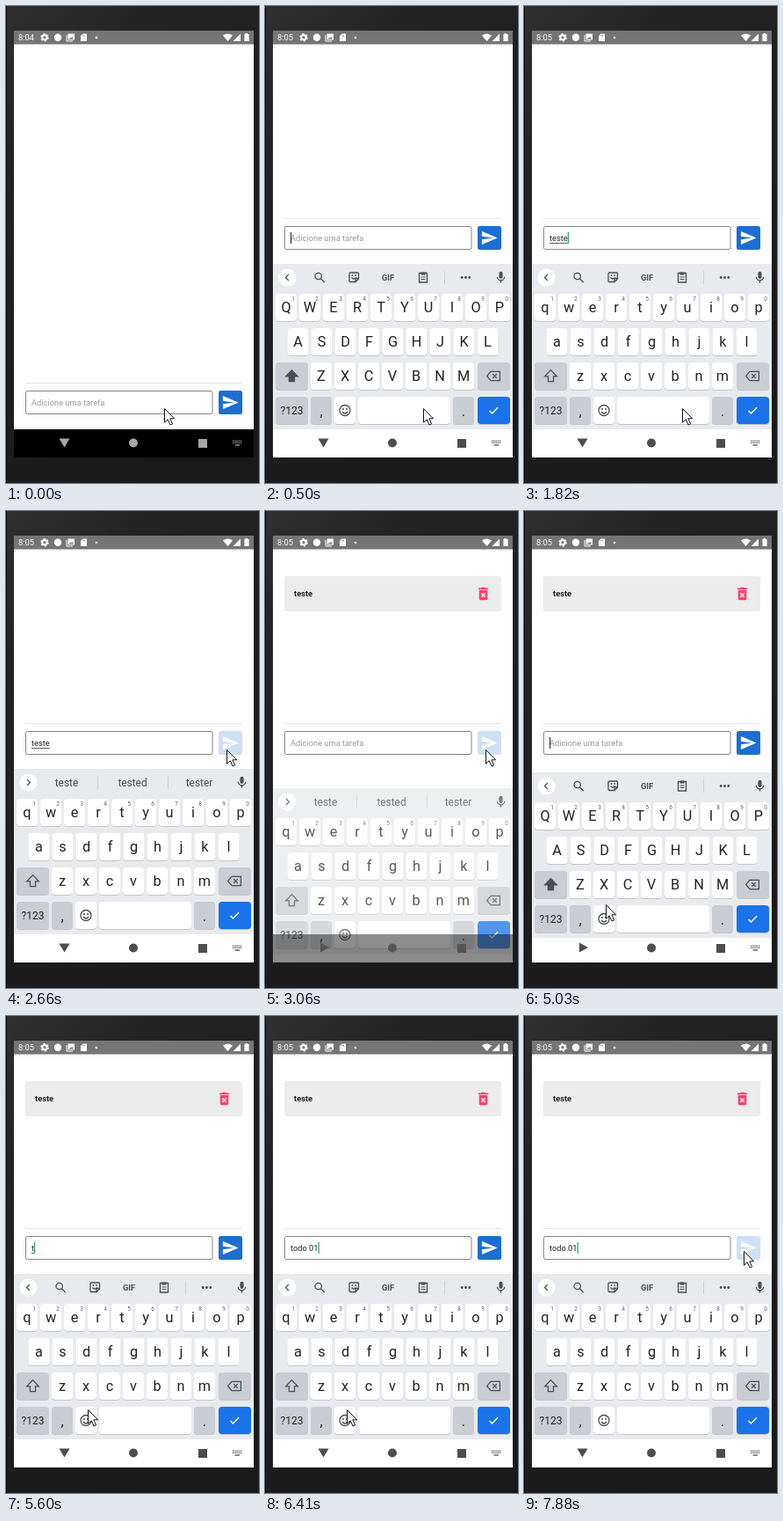
Recreate the animation shown at these times as an HTML page. Size 288 by 542 pixels, loop 8000 ms.

```html
<!DOCTYPE html>
<html lang="pt">
<head>
<meta charset="utf-8">
<title>Lista de tarefas</title>
<style>
html, body { margin: 0; width: 100%; height: 100%; overflow: hidden; background: #1c1c1c; }
svg { display: block; width: 288px; height: 542px; }
text { font: 9.3px Roboto, "Noto Sans", sans-serif; fill: #222; white-space: pre; }
.mid { text-anchor: middle; }
.key { font-size: 16.3px; text-anchor: middle; }
.hint { font-size: 6.5px; text-anchor: middle; fill: #5f6368; }
.word { font-size: 11.9px; text-anchor: middle; fill: #4a4d51; }
.line { fill: none; stroke: #4a4d51; stroke-width: 1.3; }
.dark { fill: #4a4d51; }
</style>
</head>
<body>
<svg viewBox="0 0 288 542">
  <defs>
    <linearGradient id="body" x1="0" y1="0" x2="0.5" y2="1">
      <stop offset="0" stop-color="#303030"/>
      <stop offset="0.25" stop-color="#232323"/>
      <stop offset="1" stop-color="#1a1a1a"/>
    </linearGradient>
    <clipPath id="screen"><rect x="9" y="28" width="273" height="485"/></clipPath>
  </defs>
  <rect width="288" height="542" fill="url(#body)"/>
  <rect width="1" height="542" fill="#0c0c0c"/>
  <g clip-path="url(#screen)">
    <rect x="9" y="28" width="273" height="485" fill="#fefefe"/>
    <g id="status"></g>
    <g id="item">
      <rect x="22" y="74" width="247" height="40" rx="3" fill="#ececec"/>
      <text x="33" y="97.3" font-weight="700" style="font-weight:700">teste</text>
    </g>
    <g id="form">
      <rect x="22" y="-9" width="247" height="1" fill="#e6e6e6"/>
      <rect x="22.5" y="0.5" width="212.5" height="26" rx="2" fill="#fff" stroke="#858585"/>
      <text id="hint" x="29" y="17.3" style="fill:#999">Adicione uma tarefa</text>
      <text id="typed" x="29" y="17.3"></text>
      <rect id="under" x="29" y="19" height="0.8" fill="#333"/>
      <rect id="caret" y="7" width="1.2" height="13"/>
      <g id="send"><rect x="242" width="27" height="27" rx="2.5" fill="#1c6fd0"/></g>
    </g>
    <g id="board"></g>
    <rect id="navBack" x="9" width="273"/>
    <g id="nav">
      <path id="back"/>
      <circle cx="145" cy="496.5" r="5"/>
      <rect x="219" y="492" width="10" height="10"/>
      <g id="navKeys"></g>
    </g>
  </g>
  <path id="mouse" d="M.5 .5V16.2L4.2 12.8 7 19 9.6 17.9 6.9 11.8H11.6Z" fill="#fff" stroke="#111" stroke-linejoin="round"/>
</svg>
<script>
const $ = id => document.getElementById(id);
const add = (id, html) => $(id).insertAdjacentHTML('beforeend', html);
const show = (id, on) => $(id).setAttribute('visibility', on ? 'visible' : 'hidden');
const set = (id, attrs) => { for (const k in attrs) $(id).setAttribute(k, attrs[k]); };

const icon = (d, x, y, s, attrs = 'class="dark"') =>
  `<path d="${d}" transform="translate(${x} ${y}) scale(${s}) translate(-12 -12)" ${attrs}/>`;
const rect = (x, y, w, h, fill, rx = 0) =>
  `<rect x="${x}" y="${y}" width="${w}" height="${h}" rx="${rx}" fill="${fill}"/>`;
const text = (cls, x, y, s) => `<text class="${cls}" x="${x}" y="${y}">${s}</text>`;

const PATHS = {
  send: 'M2 21l21-9L2 3v7l15 2-15 2z',
  bin: 'M6 19c0 1.1.9 2 2 2h8c1.1 0 2-.9 2-2V7H6v12zm2.46-7.12l1.41-1.41L12 12.59l2.12-2.12 1.41 1.41L13.41 14l2.12 2.12-1.41 1.41L12 15.41l-2.12 2.12-1.41-1.41L10.59 14l-2.13-2.12zM15.5 4l-1-1h-5l-1 1H5v2h14V4z',
  mic: 'M12 14c1.66 0 3-1.34 3-3V5a3 3 0 0 0-6 0v6c0 1.66 1.34 3 3 3zm5.3-3c0 3-2.54 5.1-5.3 5.1S6.7 14 6.7 11H5c0 3.41 2.72 6.23 6 6.72V21h2v-3.28c3.28-.48 6-3.3 6-6.72z',
  shift: 'M12 3L3 12.5h5V20h8v-7.5h5z',
  erase: 'M22 5H8L2 12l6 7h14zM11 9l6 6M17 9l-6 6'
};

// Status bar
add('status', rect(9, 28, 273, 15.5, '#757575') +
  `<text id="clock" x="14" y="39.3" style="fill:#fff"></text>
  <g fill="#fff">
    <circle cx="44" cy="35.7" r="2.6" fill="none" stroke="#fff" stroke-width="2"/>
    <circle cx="44" cy="35.7" r="4" fill="none" stroke="#fff" stroke-width="1.6" stroke-dasharray="2.1"/>
    <circle cx="59" cy="35.7" r="4.2"/>
    <path d="M69 33v7h7" fill="none" stroke="#fff"/>
    <path d="M70.5 31.5h7.5v7h-7.5zM71.5 37.5h5.6l-1.8-2.6-1.4 1.6-.9-1z" fill-rule="evenodd"/>
    <path d="M87.5 31.5h4.5v8.5h-7v-6zM87.5 33v1.6h.8V33zM89.3 33v1.6h.8V33z" fill-rule="evenodd"/>
    <circle cx="103" cy="36" r="1.3"/>
    <path d="M247 33.6Q252.5 29.6 258 33.6L252.5 40Z"/>
    <path d="M267 31.5V40h-8.5z"/>
    <path d="M272.5 31h2.5v1h1.6v8h-5.2v-8h1.1z"/>
  </g>`);

add('item', icon(PATHS.bin, 248.5, 94, .8, 'fill="#f9416f"'));
add('send', icon(PATHS.send, 255.3, 13.5, .84, 'fill="#fff"'));

// Keyboard, laid out at its resting place
const letters = ['qwertyuiop', 'asdfghjkl', 'zxcvbnm'];
const rowX = [24, 37.5, 64];
const GREY = '#cacdd3';
const key = (x, y, w, fill = '#fff') =>
  rect(x, y + 1, w, 31, '#c3c6ca', 4) + rect(x, y, w, 31, fill, 4);

let board = rect(9, 293, 273, 188.5, '#e8eaed') +
  '<circle cx="25.5" cy="308.5" r="10" fill="#fff"/><path id="chevron" class="line"/>' +
  icon(PATHS.mic, 268.5, 308.5, .68);

board += '<g id="tools">' +
  `<circle cx="60.7" cy="307" r="3.7" class="line"/><path d="M63.4 309.7l4.4 4.4" class="line" stroke-width="1.6"/>
  <path d="M97 303h8.5q1 0 1 1v6l-3.5 3.5h-6q-1 0-1-1v-8.500q0-1 1-1zM103 313v-3.500h3.500" class="line"/>
  <path d="M98.500 308.500q2.500 3 5 0" class="line" stroke-width="1"/>
  <circle cx="99.500" cy="306" r=".9" class="dark"/><circle cx="103" cy="306" r=".9" class="dark"/>
  <text class="mid" x="140" y="312" style="font-weight:700;fill:#4a4d51">GIF</text>
  <path d="M175.500 303.500h9v10.500h-9z" class="line"/>
  <path d="M177.500 302.500h5v3h-5zM177.500 307.500h5v1h-5zM177.500 310h5v1h-5z" class="dark"/>` +
  rect(204, 301, 1, 15, '#cfd1d5') +
  [224.2, 228.5, 232.8].map(x => `<circle cx="${x}" cy="308.5" r="1.4" class="dark"/>`).join('') + '</g>';

board += '<g id="words">' + [69, 144, 220].map(x => text('word', x, 312.5, '')).join('') +
  rect(104, 301, 1, 15, '#cfd1d5') + rect(184, 301, 1, 15, '#cfd1d5') + '</g>';

letters.forEach((row, r) => [...row].forEach((c, i) => {
  const x = rowX[r] + i * 27, y = 327 + r * 39;
  board += key(x - 12, y, 24) + text('key letter', x, y + 20.7, c);
  if (!r) board += text('hint', x + 8, y + 7.500, (i + 1) % 10);
}));

board += key(12, 405, 37, GREY) + icon(PATHS.shift, 30.500, 420.500, .76, 'id="shift" class="line" style="stroke-width:1.7"') +
  key(242, 405, 37, GREY) + icon(PATHS.erase, 260, 420.500, .74, 'class="line" style="stroke-width:1.7"') +
  key(12, 444, 37, GREY) + '<text class="mid" x="30.500" y="464.300" style="font-size:12px">?123</text>' +
  key(52, 444, 24, GREY) + text('key', 64, 465.500, ',') +
  key(79, 444, 24) +
  `<circle cx="91" cy="459.500" r="6" class="line"/><path d="M88 461q3 4 6 0" class="line"/>
  <circle cx="89" cy="458" r="1" class="dark"/><circle cx="93" cy="458" r="1" class="dark"/>` +
  key(106, 444, 105) + key(214, 444, 24, GREY) + text('key', 226, 465.500, '.') +
  key(242, 444, 37, '#1a73e8') +
  '<path d="M255.500 460l3 3 6.500-6.800" fill="none" stroke="#fff" stroke-width="1.5"/>';
add('board', board);

let dots = '';
for (let r = 0; r < 2; r++)
  for (let i = 0; i < 5; i++) dots += rect(258 + i * 2.2, 493.5 + r * 2.2, 1.3, 1.3, 'inherit');
add('navKeys', dots.replaceAll('fill="inherit"', '') + '<rect x="260.500" y="498.300" width="5.500" height="1.300"/>');

const ARROWS = {
  down: 'M60.5 491.5h12l-6 10z',
  right: 'M63 490.5v11l10-5.500z',
  left: 'M60.5 496.5l10-5.5v11z'
};
// Back fill, its opacity, icon fill, arrow, keyboard switch
const NAVS = {
  black: ['#000', 1, '#fff', 'left', false],
  wait: ['#000', 1, '#a6a6a6', 'down', true],
  half: ['#000', .45, '#555', 'right', false],
  turn: ['#fff', 1, '#4d4d4d', 'right', true],
  white: ['#fff', 1, '#4d4d4d', 'down', true]
};

const closed = { up: false, drop: 230, nav: 'black', press: 1 };
const rising = drop => ({ up: true, drop, fade: .75, nav: 'half', caps: true });
const nearly = { drop: 4, fade: 1, nav: 'turn', caret: true };
const open = { drop: 0, nav: 'white' };
const at = (x, y) => ({ mouse: [x, y] });

// Each step changes part of the state and holds
const steps = [
  [0, { ...closed, clock: '8:04', nav: 'wait', value: '', line: false, caret: false, caps: true,
        fade: 1, item: false, words: '', ...at(180, 457) }],
  [140, { ...rising(70), clock: '8:05' }],
  [290, nearly],
  [430, open],
  [870, { value: 't', line: true, caps: false }],
  [1150, { value: 'te' }],
  [1430, { value: 'tes' }],
  [1550, { value: 'test' }],
  [1670, { value: 'teste' }],
  [1970, { words: 'teste tested tester', ...at(196, 422) }],
  [2110, at(224, 350)],
  [2270, at(246, 292)],
  [2390, at(251, 271)],
  [2540, { press: .5 }],
  [2660, { press: .2, caret: false }],
  [3060, { value: '', line: false, item: true, drop: 22, fade: .75, nav: 'half' }],
  [3210, { ...closed, words: '' }],
  [3480, at(238, 298)],
  [3620, at(198, 350)],
  [3760, at(148, 404)],
  [3900, at(108, 438)],
  [4030, at(88, 446)],
  [4170, at(93, 447)],
  [4670, { nav: 'wait' }],
  [4790, rising(90)],
  [4910, rising(22)],
  [5030, nearly],
  [5180, open],
  [5600, { value: 't', line: true, caps: false }],
  [5720, { value: 'to' }],
  [5840, { value: 'tod' }],
  [5980, { value: 'todo', words: 'todo todos toda' }],
  [6120, { value: 'todo ', line: false }],
  [6270, { value: 'todo 0', words: '' }],
  [6410, { value: 'todo 01' }],
  [7060, { caret: false, ...at(108, 400) }],
  [7200, at(158, 288)],
  [7330, at(212, 204)],
  [7460, at(246, 178)],
  [7600, { caret: true, ...at(250, 267) }],
  [7880, { press: .2 }]
];

function draw(s) {
  $('clock').textContent = s.clock;
  show('item', s.item);
  set('form', { transform: `translate(0 ${s.up ? 250 : 437})` });
  set('send', { opacity: s.press });

  $('typed').textContent = s.value;
  const width = s.value ? $('typed').getComputedTextLength() : 0;
  show('hint', !s.value);
  show('under', s.line);
  set('under', { width });
  show('caret', s.caret);
  set('caret', { x: 29 + width, fill: s.value ? '#26998c' : '#333' });

  set('board', { transform: `translate(0 ${s.drop})`, opacity: s.fade });
  show('board', s.up);
  const words = s.words.split(' ');
  $('words').style.display = s.words ? '' : 'none';
  $('tools').style.display = s.words ? 'none' : '';
  document.querySelectorAll('.word').forEach((w, i) => w.textContent = words[i] || '');
  set('chevron', { d: s.words ? 'M24 305l3.500 3.500-3.500 3.500' : 'M27 305l-3.500 3.500 3.500 3.500' });
  document.querySelectorAll('.letter').forEach(k => {
    k.textContent = s.caps ? k.textContent.toUpperCase() : k.textContent.toLowerCase();
  });
  $('shift').style.fill = s.caps ? '#4a4d51' : 'none';

  const [fill, opacity, color, arrow, keys] = NAVS[s.nav];
  const top = 481 + (fill === '#fff' ? s.drop : 0);
  set('navBack', { y: top, height: 513 - top, fill, opacity });
  set('nav', { fill: color });
  set('back', { d: ARROWS[arrow] });
  $('navKeys').style.display = keys ? '' : 'none';
  set('mouse', { transform: `translate(${s.mouse})` });
}

let last = -1;
function tick() {
  const t = performance.now() % 8000;
  const past = steps.filter(([time]) => time <= t);
  if (past.length !== last) {
    last = past.length;
    draw(Object.assign({}, ...past.map(step => step[1])));
  }
  requestAnimationFrame(tick);
}
tick();
</script>
</body>
</html>
```
